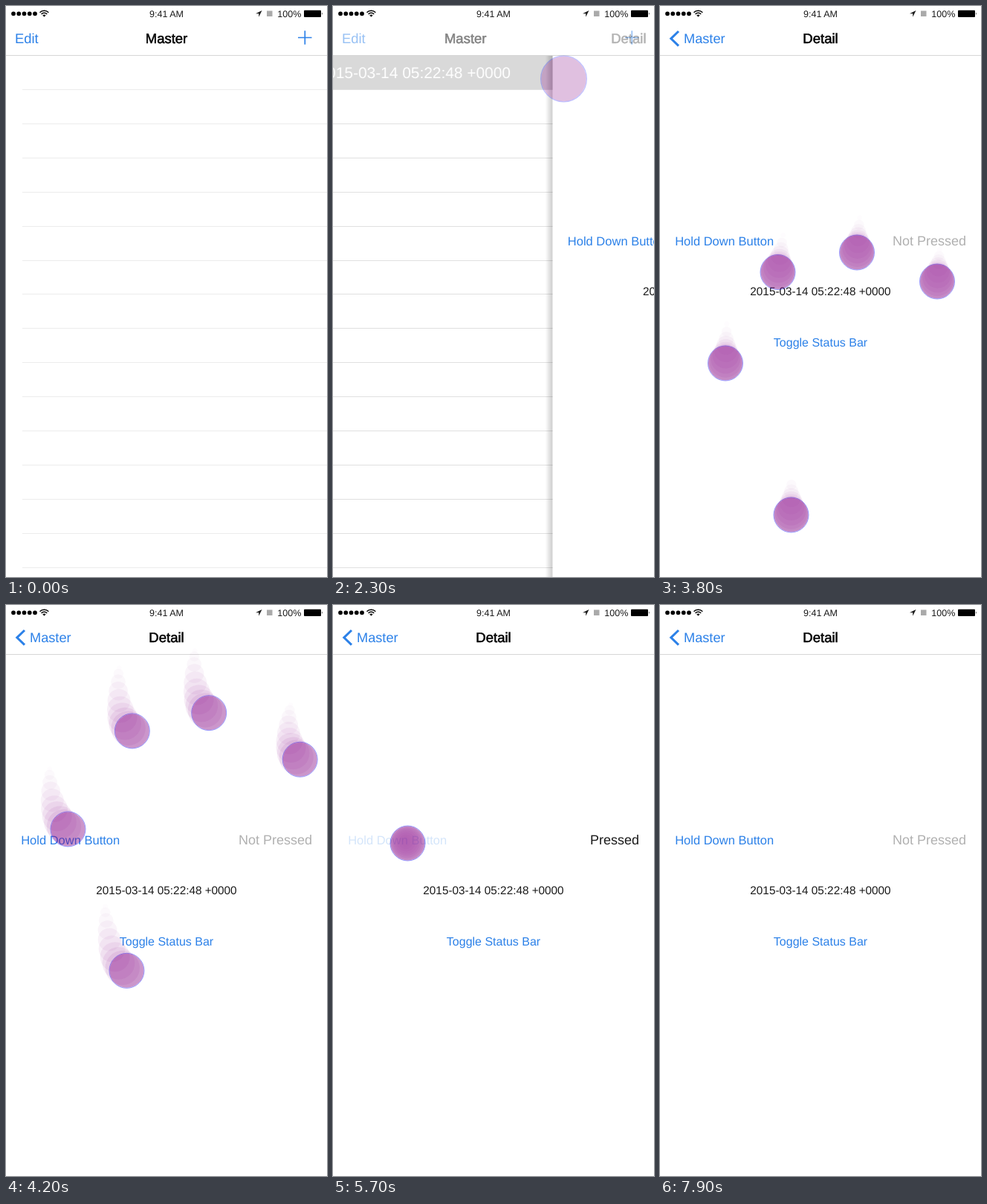
Animation of 432x768 px, one loop 8000 ms. Source, as an HTML page with a canvas:

```html
<!DOCTYPE html>
<html lang="en">
<head>
<meta charset="utf-8">
<title>Touch demo</title>
<style>
  html, body { margin: 0; width: 100%; height: 100%; overflow: hidden; background: #fff; }
  svg, canvas { position: absolute; left: 0; top: 0; width: 432px; height: 768px; }
  svg {
    --t: 0; --p: 0; --n: 0;
    overflow: hidden; fill: #1a1a1a;
    font-family: "Liberation Sans", Arial, sans-serif;
    text-rendering: geometricPrecision;
  }
  .blue { fill: #2c81e8; }
  .line { stroke: #2c81e8; fill: none; }
  .mid { text-anchor: middle; }
  .end { text-anchor: end; }
  .title { font-size: 18.5px; fill: #000; stroke: #000; stroke-width: .55px; }

  /* Push transition: --p moves the pages, --n moves the bar items. */
  #list { transform: translateX(calc(var(--p) * -129.6px)); }
  #detail { transform: translateX(calc((1 - var(--p)) * 432px)); }
  .leaving { opacity: calc(1 - var(--n) * 2.1); }
  .arriving { opacity: calc(var(--n) * 1.25); }
  .back { opacity: calc(var(--n) * 2 - 0.8); }
  #oldTitle { transform: translateX(calc(var(--n) * -156px)); }
  #newTitle { transform: translateX(calc((1 - var(--n)) * 240px)); }
  #backLabel { transform: translateX(calc((1 - var(--n)) * 156px)); }

  /* Keyframes are paused and scrubbed by --t, in ms. */
  .timed { animation: 8s step-end calc(var(--t) * -1ms) infinite paused; }
  #row { animation-name: insert; animation-timing-function: ease-out; }
  #rowFill { animation-name: select; }
  #rowText { animation-name: whiten; }
  #rules { animation-name: rules; }
  #plus { animation-name: tap; }
  #hold { animation-name: dim; }
  #idle { animation-name: hide; }
  #pressed { animation-name: show; }
  @keyframes insert {
    0%, 14.5% { opacity: 0; transform: translateY(-46px); }
    18.7%, 100% { opacity: 1; transform: none; }
  }
  @keyframes select { 0% { opacity: 0; } 26.9%, 100% { opacity: 1; } }
  @keyframes whiten { 0% { fill: #1a1a1a; } 26.9%, 100% { fill: #fff; } }
  @keyframes rules { 0% { stroke: #ececec; } 26.2%, 100% { stroke: #e0e0e0; } }
  @keyframes tap { 0% { opacity: 1; } 13.7% { opacity: .25; } 14.9%, 100% { opacity: 1; } }
  @keyframes dim { 0% { opacity: 1; } 64.9% { opacity: .2; } 94.9%, 100% { opacity: 1; } }
  @keyframes hide { 0% { opacity: 1; } 64.9% { opacity: 0; } 94.9%, 100% { opacity: 1; } }
  @keyframes show { 0% { opacity: 0; } 64.9% { opacity: 1; } 94.9%, 100% { opacity: 0; } }
</style>
</head>
<body>
<svg id="screen" viewBox="0 0 432 768">
  <defs>
    <linearGradient id="shade">
      <stop offset="0" stop-opacity="0"/>
      <stop offset="1" stop-opacity=".2"/>
    </linearGradient>
  </defs>
  <rect width="432" height="768" fill="#fff"/>

  <g id="list">
    <path id="rules" class="timed"/>
    <g id="row" class="timed">
      <rect id="rowFill" class="timed" y="67" width="432" height="45" fill="#d9d9d9"/>
      <text id="rowText" class="timed" x="21.5" y="97" font-size="20.9">2015-03-14 05:22:48 +0000</text>
    </g>
  </g>

  <g id="detail">
    <rect x="-10" y="66" width="10" height="702" fill="url(#shade)"/>
    <rect y="66" width="432" height="702" fill="#fff"/>
    <text id="hold" class="timed blue" x="20.2" y="321.5" font-size="16.5">Hold Down Button</text>
    <text id="idle" class="timed end" x="412" y="321.5" font-size="18" fill="#b0b0b0">Not Pressed</text>
    <text id="pressed" class="timed end" x="412" y="321.5" font-size="18">Pressed</text>
    <text class="mid" x="216" y="389.3" font-size="15.3">2015-03-14 05:22:48 +0000</text>
    <text class="mid blue" x="216" y="458.3" font-size="16">Toggle Status Bar</text>
  </g>

  <rect width="432" height="66" fill="#fff"/>
  <path d="M0 66.5H432" stroke="#d6d6d6"/>
  <g class="leaving">
    <text class="blue" x="12" y="50" font-size="18.4">Edit</text>
    <text id="oldTitle" class="mid title" x="216" y="50">Master</text>
    <path id="plus" class="timed line" d="M393 42.5h18.5M402.3 33.2v18.5" stroke-width="1.7"/>
  </g>
  <text id="newTitle" class="mid title arriving" x="216" y="50">Detail</text>
  <g class="back">
    <path class="line" d="M25 34L14.8 43.8 25 53.6" stroke-width="3"/>
    <text id="backLabel" class="blue" x="32" y="50" font-size="18.2">Master</text>
  </g>

  <g id="status">
    <path d="M10 10.3h29.1" stroke="#000" stroke-width="5.8" stroke-linecap="round" stroke-dasharray="0 7.25"/>
    <path d="M45.5 8.7a8.2 8.2 0 0 1 11.8 0M47.6 10.9a5.2 5.2 0 0 1 7.6 0" fill="none" stroke="#000" stroke-width="1.5"/>
    <path d="M49.2 12.6a3.2 3.2 0 0 1 4.4 0L51.4 14.8z"/>
    <text class="mid" x="216" y="15" font-size="12.5">9:41 AM</text>
    <path d="M344.5 6L336 10.3h4.2v4.4z"/>
    <rect x="351" y="6.5" width="7.5" height="7.5" fill="#aaa"/>
    <text class="end" x="397.3" y="15" font-size="12.5">100%</text>
    <rect x="401" y="5.7" width="23" height="9.2" rx="1" fill="#000"/>
    <path d="M425 8.6q1.6 1.7 0 3.4z"/>
  </g>
</svg>
<canvas id="touches" width="432" height="768"></canvas>

<script>
const LOOP = 8000, STEP = 100, RADIUS = 24;
const FADE = 330, TRAIL = 200, TRAIL_STEP = 20;
const screenEl = document.getElementById('screen');
const detail = document.getElementById('detail');
const ctx = document.getElementById('touches').getContext('2d');

let rules = '';
for (let i = 1; i <= 15; i++) rules += `M22 ${Math.floor(66.5 + 45.92 * i) + .5}H432`;
document.getElementById('rules').setAttribute('d', rules);

const lerp = (a, b, k) => a + (b - a) * k;
const mix = (p, q, k) => [lerp(p[0], q[0], k), lerp(p[1], q[1], k)];
const span = (t, from, to) => Math.min(1, Math.max(0, (t - from) / (to - from)));
const smooth = k => k * k * (3 - 2 * k);

const tap = (start, end, x, y, r) => ({ start, end, r, stretch: 0, at: () => [x, y] });

// Each finger sweeps down from land to low, then swings back up and settles at rest.
const SWEEP = 3400, LOW = 3800, SWING = 450;
function finger({ start, end = 4550, low, rest, land = rest, r }) {
  const at = t => {
    if (t < LOW) {
      const [x, y] = mix(land, low, Math.sin(span(t, SWEEP, LOW) * Math.PI / 2));
      const early = Math.max(0, SWEEP - t);
      return [x + early * .12, y - early * .17];
    }
    const age = t - LOW;
    const [x, y] = mix(low, rest, 1 - Math.cos(age / SWING * 2 * Math.PI) * Math.exp(-age / 190));
    return [x - 45 * Math.sin(span(age, 0, SWING) * Math.PI), y];
  };
  return { start, end, r, stretch: .05, at };
}

// A press that slips, arcs to the right, then swings up and down the page.
function dragAt(t) {
  if (t < 6250) {
    const from = mix([97, 317.5], [100.5, 320.5], span(t, 5500, 5700));
    const bend = [350, 370], to = [184, 434];
    const k = smooth(span(t, 5700, 6100));
    return mix(mix(from, bend, k), mix(bend, to, k), k);
  }
  const a = (t - 6250) / 700 * Math.PI;
  return [125 + 59 * Math.cos(2 * a), 250 + 184 * Math.cos(a)];
}

const touches = [
  tap(1090, 1180, 402, 43, 42),
  tap(2090, 2170, 310.5, 98, 31.5),
  finger({ start: 3360, land: [280, 137], low: [265, 331.5], rest: [291, 126], r: 38 }),
  finger({ start: 3360, land: [387, 191], low: [373, 370.5], rest: [415, 191], r: 38 }),
  finger({ start: 3395, land: [96, 259], low: [88, 480.5], rest: [100, 283], r: 42 }),
  finger({ start: 3430, end: 4407, low: [158.5, 358], rest: [188, 150], r: 36.5 }),
  finger({ start: 3640, low: [176.5, 684.5], rest: [178, 472], r: 39 }),
  { start: 5190, end: 7550, r: 34, stretch: 0, at: dragAt }
];

function disc(x, y, rx, ry, alpha, rim = 0) {
  const oval = inset => {
    ctx.beginPath();
    ctx.ellipse(x, y, rx - inset, ry - inset, 0, 0, 2 * Math.PI);
  };
  ctx.globalAlpha = alpha;
  ctx.fillStyle = '#800080';
  oval(rim);
  ctx.fill();
  if (!rim) return;
  ctx.lineWidth = rim;
  ctx.strokeStyle = '#00f';
  oval(rim / 2);
  ctx.stroke();
}

function drawTouch({ start, end, r, stretch, at }, t) {
  if (t < start || t > end + FADE) return;
  const grow = span(t, end, end + 50);
  const size = lerp(RADIUS, r, grow), oval = stretch * grow;
  const alpha = .41 * (1 - span(t, end, end + FADE));
  disc(...at(Math.min(t, end)), size * (1 - oval), size * (1 + oval), alpha, size / RADIUS);

  for (let back = TRAIL_STEP; back < TRAIL; back += TRAIL_STEP) {
    const when = t - back;
    if (when < start || when > end) continue;
    const [x, y] = at(when), [nextX, nextY] = at(when + TRAIL_STEP);
    if (Math.hypot(x - nextX, y - nextY) < .05) continue;
    const left = 1 - (back / TRAIL) ** 1.5;
    disc(x, y, RADIUS * left, RADIUS * left, .08 * left);
  }
}

// Critically damped spring from 0 to 1.
function spring(ms, rate) {
  if (ms <= 0) return 0;
  if (ms >= 700) return 1;
  const u = ms / 1000 * rate;
  return 1 - (1 + u) * Math.exp(-u);
}

function render(t) {
  screenEl.style.setProperty('--t', t);
  screenEl.style.setProperty('--p', spring(t - 2200, 11.4));
  screenEl.style.setProperty('--n', spring(t - 2200, 9.4));
  detail.style.visibility = t > 2200 ? 'visible' : 'hidden';
  ctx.clearRect(0, 0, 432, 768);
  for (const touch of touches) drawTouch(touch, t);
}

// The picture advances ten times a second.
const began = performance.now();
let shown = -1;
function tick() {
  const t = Math.floor((performance.now() - began) % LOOP / STEP) * STEP;
  if (t !== shown) render(shown = t);
  requestAnimationFrame(tick);
}
tick();
</script>
</body>
</html>
```
